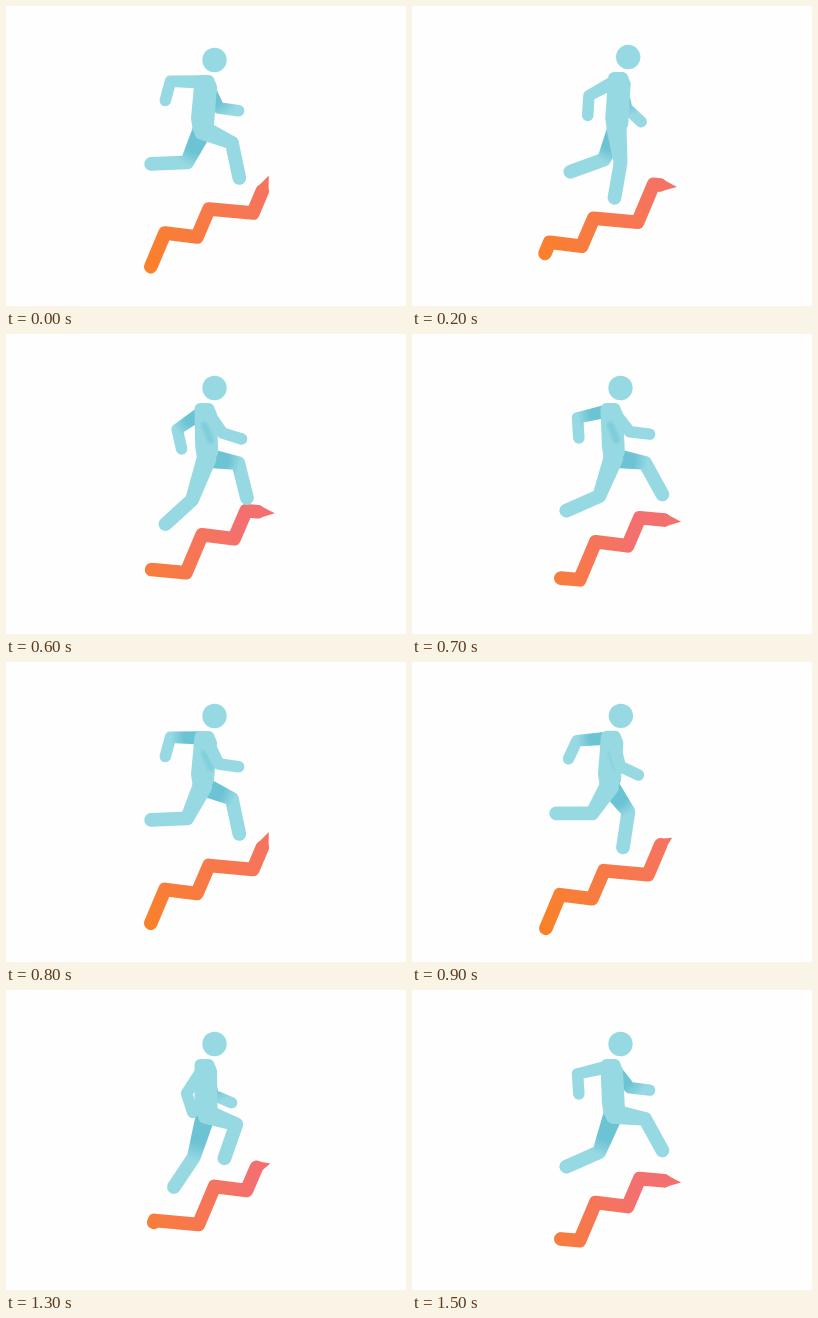
An HTML page that plays this animation: 400 by 300 pixels, repeating every 1.6 s.

```html
<!DOCTYPE html>
<html lang="en">
<head>
<meta charset="utf-8">
<title>Runner on rising steps</title>
<style>
html, body { margin: 0; width: 100%; height: 100%; overflow: hidden; background: #fefefe; }
svg { display: block; width: 100vw; height: 100vh; }
path { stroke-linecap: round; stroke-linejoin: round; }
.arm { stroke-width: 11.5; }
.leg { stroke-width: 13.8; }
.light { fill: #97d9e3; stroke: #97d9e3; }
#torso { stroke-width: 12; }
#farArm { fill: url(#armShade); stroke: url(#armShade); }
#farLeg { fill: url(#legShade); stroke: url(#legShade); }
#steps { fill: none; stroke: url(#warm); stroke-width: 13.6; }
</style>
</head>
<body>
<svg viewBox="0 0 400 300">
  <defs>
    <linearGradient id="warm" gradientUnits="userSpaceOnUse" y1="258">
      <stop offset="0" stop-color="#fa8128"/>
      <stop offset="1" stop-color="#f4706e"/>
    </linearGradient>
    <radialGradient id="armShade" gradientUnits="userSpaceOnUse">
      <stop offset=".62" stop-color="#6cc3d4"/>
      <stop offset="1" stop-color="#97d9e3"/>
    </radialGradient>
    <radialGradient id="legShade" gradientUnits="userSpaceOnUse">
      <stop offset=".62" stop-color="#6cc3d4"/>
      <stop offset="1" stop-color="#97d9e3"/>
    </radialGradient>
    <filter id="soft" x="-60%" y="-60%" width="220%" height="220%">
      <feGaussianBlur stdDeviation="1.6"/>
    </filter>
  </defs>
  <path id="steps"/>
  <path id="tip" fill="url(#warm)"/>
  <path id="farArm" class="arm"/>
  <path id="farLeg" class="leg"/>
  <path id="torso" class="light"/>
  <path id="fold" stroke="#74c7d7" stroke-width="7" filter="url(#soft)"/>
  <path id="nearLeg" class="leg light"/>
  <path id="nearArm" class="arm light"/>
  <circle id="head" r="12.2" fill="#97d9e3"/>
</svg>
<script>
const TICK = 100, FRAMES = 16, STRIDE = 8;

const $ = id => document.getElementById(id);
const set = (el, attrs) => { for (const k in attrs) el.setAttribute(k, attrs[k]); };
const path = pts => "M" + pts.map(p => p[0].toFixed(2) + " " + p[1].toFixed(2)).join("L");
const mix = (a, b, u) => a + (b - a) * u;
const clamp = v => Math.min(1, Math.max(0, v));
const rad = deg => deg * Math.PI / 180;

// A mean plus harmonics, each a cosine and a sine amount
const wave = (mean, ...parts) => turn => parts.reduce((sum, [c, s], i) => {
  const a = 2 * Math.PI * turn * (i + 1);
  return sum + c * Math.cos(a) + s * Math.sin(a);
}, mean);

// Swing in degrees from straight down, forward positive
const thigh = wave(15.3, [46, -27], [1.3, -19.5], [0, 2.2], [4, -0.5]);
const calf = wave(-30.8, [46.4, 5.6], [-4.6, -11.5], [3.3, -6.1], [-2.4, -7.1]);
const upperArm = wave(-19.2, [-59.2, 3.3], [-10.2, -7], [0, 2.6], [-2.6, -3]);
const foreArm = wave(35.8, [-43.9, 10.3], [-5.8, -10.4], [-4.7, -7], [3.5, -4.5]);

// Left and right ends of the visible staircase
const stairStart = wave(143.8, [-3.5, -6.3], [4.5, -3]);
const stairTip = wave(265.3, [-0.9, -2], [-1.6, -3.1]);

const reach = ([x, y], deg, len) => [x + len * Math.sin(rad(deg)), y + len * Math.cos(rad(deg))];

function leg(hip, turn) {
  const push = Math.max(0, Math.cos(2 * Math.PI * (turn - 0.34))) ** 2;
  const knee = reach(hip, thigh(turn), 32 + 13 * push);
  return [hip, knee, reach(knee, calf(turn), 36)];
}

function arm(root, turn) {
  const swing = upperArm(turn);
  const elbow = reach(root, swing, 31 - 4 * Math.sin(rad(swing)));
  return [root, elbow, reach(elbow, foreArm(turn), 20)];
}

// Limb that widens by `flare` on each side of its root
function drawLimb(id, [root, joint, end], flare) {
  const dx = joint[0] - root[0], dy = joint[1] - root[1];
  const k = flare / Math.hypot(dx, dy);
  const a = [root[0] - dy * k, root[1] + dx * k];
  const b = [root[0] + dy * k, root[1] - dx * k];
  set($(id), { d: path([a, joint, end, joint, b]) + "Z" });
}

function shade(id, [root, joint], amount) {
  const r = Math.hypot(joint[0] - root[0], joint[1] - root[1]) * amount;
  set($(id), { cx: root[0], cy: root[1], r });
}

function drawRunner(t) {
  const p = t % STRIDE, turn = t / FRAMES, other = turn + 0.5;
  const lift = Math.max(0, Math.cos((p - 2.4) * Math.PI / 3.2)) ** 2;
  const sx = 199.5 + 9 * lift, sy = 75 - 3.5 * lift;
  const hx = 196.5 + 8 * lift + 0.7 * p;
  const hip = [hx, 124], shoulder = [sx, sy + 1];
  const farArm = arm(shoulder, other), farLeg = leg(hip, other);

  drawLimb("nearArm", arm(shoulder, turn), 1);
  drawLimb("farArm", farArm, 1);
  drawLimb("nearLeg", leg(hip, turn), 3);
  drawLimb("farLeg", farLeg, 3);
  shade("armShade", farArm, 1.25 + 0.25 * Math.sin(rad(upperArm(other))));
  shade("legShade", farLeg, 1.08);

  set($("torso"), {
    d: path([[sx - 5, sy], [sx + 3, sy], [sx + 5.5, sy + 6], [hx + 5.5, 118],
      [hx + 2, 124], [hx - 4, 122], [hx - 5.5, 112]]) + "Z"
  });
  set($("fold"), {
    d: path([[sx - 1, sy + 16], [sx + 5, sy + 31]]),
    opacity: clamp(0.25 + Math.sin(rad(upperArm(turn)))) * 0.8
  });
  set($("head"), { cx: sx + 9, cy: sy - 21 });
}

// Short and long treads by turns, each followed by its riser
function stairs(x, y) {
  const pts = [[x - 104, y + 58]];
  for (let n = 0; n < 6; n++) {
    const long = n % 2;
    const [cx, cy] = pts[pts.length - 1];
    const tx = cx + (long ? 44 : 32), ty = cy + 4;
    pts.push([tx, ty], [tx + (long ? 16 : 12), ty - (long ? 38 : 28)]);
  }
  return pts;
}

// Keeps the part of a rising line between two x values
function trim(pts, x0, x1) {
  const out = [];
  for (let i = 1; i < pts.length; i++) {
    const [ax, ay] = pts[i - 1], [bx, by] = pts[i];
    if (bx <= x0 || ax >= x1) continue;
    const at = x => [x, mix(ay, by, (x - ax) / (bx - ax))];
    if (!out.length) out.push(at(Math.max(ax, x0)));
    out.push(at(Math.min(bx, x1)));
  }
  return out;
}

// Removes a length from the end of a line and returns the old end
function shorten(line, len) {
  const end = line[line.length - 1];
  while (line.length > 1) {
    const b = line.pop(), a = line[line.length - 1];
    const d = Math.hypot(b[0] - a[0], b[1] - a[1]);
    if (d > len) {
      line.push([mix(b[0], a[0], len / d), mix(b[1], a[1], len / d)]);
      break;
    }
    len -= d;
  }
  return end;
}

function drawSteps(t) {
  const p = t % STRIDE, turn = p / STRIDE;
  const ease = Math.sin(Math.PI * turn) ** 2;
  const sink = 5 * (t / (FRAMES - 1)) ** 4;
  const line = trim(
    stairs(159 - 11.4 * p + 3 * ease, 227 + 5.6 * p - 4 * ease + sink),
    stairStart(turn), stairTip(turn));
  const [tx, ty] = shorten(line, 17);
  const [bx, by] = line[line.length - 1];
  const k = 6.8 / Math.hypot(tx - bx, ty - by);
  const nx = (by - ty) * k, ny = (tx - bx) * k;
  set($("steps"), { d: path(line) });
  set($("tip"), { d: path([[bx + nx, by + ny], [tx, ty], [bx - nx, by - ny]]) + "Z" });

  const x1 = 130 - 3 * p, x2 = 295 - 11.4 * p;
  set($("warm"), { x1, x2, y2: 258 - (x2 - x1) * 0.6 });
}

let shown = -1, start = null;
function draw(ms) {
  const t = Math.floor(ms / TICK) % FRAMES;
  if (t === shown) return;
  shown = t;
  drawSteps(t);
  drawRunner(t);
}
function loop(now) {
  if (start === null) start = now;
  draw(Math.max(0, now - start));
  requestAnimationFrame(loop);
}
draw(0);
requestAnimationFrame(loop);
</script>
</body>
</html>
```
